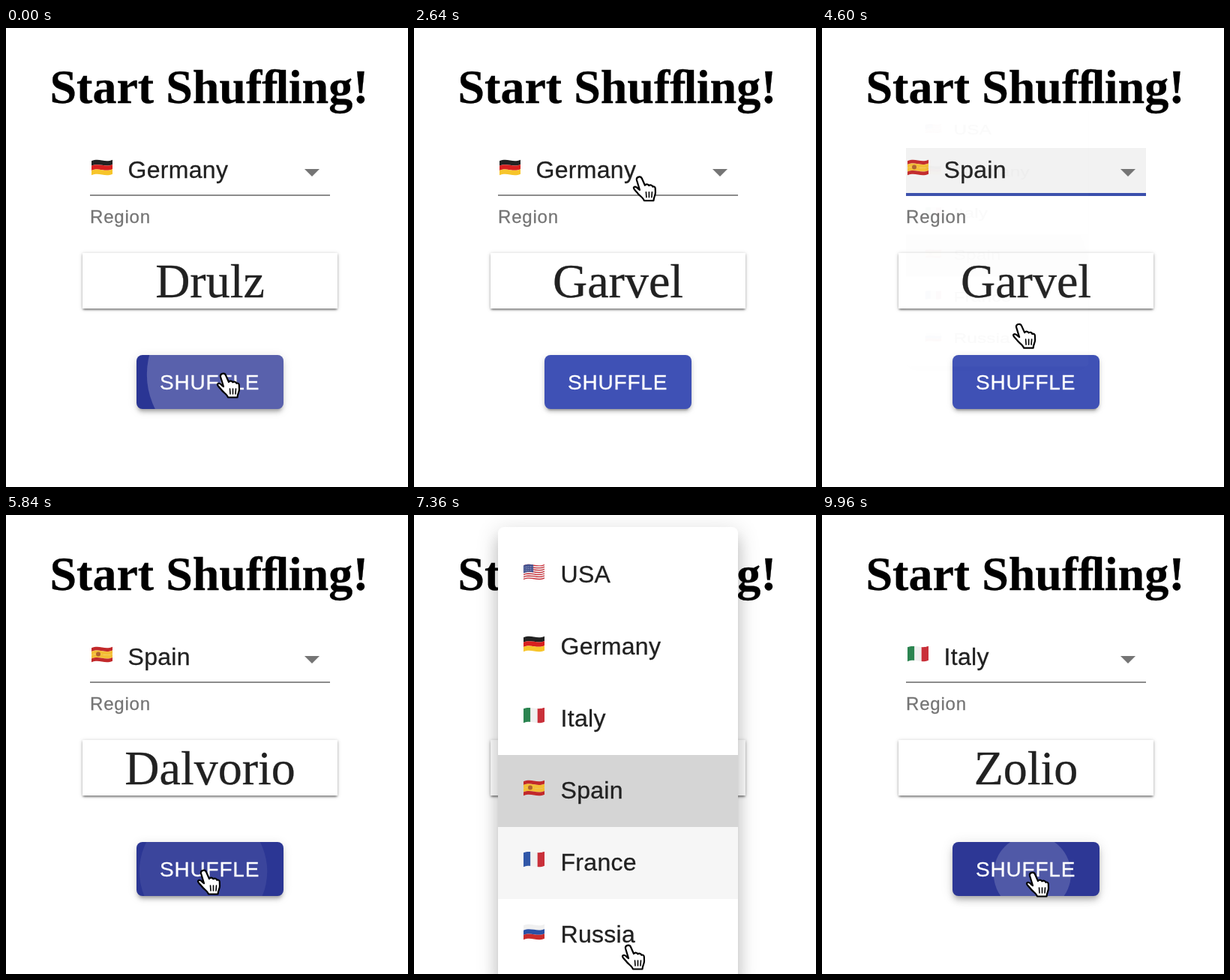
An HTML page for the animation above (10000 ms loop, 536 by 612 pixels).

```html
<!DOCTYPE html>
<html lang="en">
<head>
<meta charset="utf-8">
<title>Start Shuffling!</title>
<style>
html, body { margin: 0; width: 100%; height: 100%; overflow: hidden; background: #fff; }
#stage { position: relative; width: 536px; height: 612px; overflow: hidden; background: #fff; font: 32px/0 "Liberation Sans", Arial, sans-serif; color: #212121; }
#stage div, #stage svg { position: absolute; }
.text { white-space: nowrap; -webkit-text-stroke: .3px; }
.serif { font-family: "Liberation Serif", Times, serif; font-size: 64px; left: 0; width: 100%; text-align: center; }
#title { top: 78.5px; left: 3px; font-weight: bold; color: #000; }
#select { left: 112px; top: 160px; width: 320px; height: 64px; }
#focus { inset: 0; background: #f2f2f2; }
#line { left: 0; top: 62px; width: 320px; height: 2px; background: #8c8c8c; }
#accent { left: 0; top: 60px; width: 320px; height: 4px; background: #3a4fac; }
#arrow { left: 286px; top: 28px; border: 10px solid transparent; border-top-color: #757575; border-bottom: 0; }
#value { left: 50.5px; top: 29px; letter-spacing: .3px; }
#flag { left: 2px; top: 15px; }
#region { left: 112px; top: 251.5px; font-size: 24px; letter-spacing: .8px; color: #757575; }
#card { left: 102px; top: 300px; width: 340px; height: 74px; background: #fff;
  box-shadow: 0 4px 2px -2px rgba(0,0,0,.2), 0 2px 2px rgba(0,0,0,.2), 0 1px 5px rgba(0,0,0,.26); }
#name { top: 37.5px; }
#button { left: 174px; top: 436px; width: 196px; height: 72px; border-radius: 8px; overflow: hidden; color: #fff; }
#button .text { left: 31px; top: 36.5px; font-size: 28px; letter-spacing: .8px; }
#menu { left: 112px; width: 320px; height: 608px; border-radius: 8px; background: #fff;
  box-shadow: 0 10px 10px -6px rgba(0,0,0,.2), 0 16px 20px 2px rgba(0,0,0,.14), 0 6px 28px 4px rgba(0,0,0,.12); }
.item { left: 0; width: 320px; height: 96px; overflow: hidden; }
.item svg { left: 34px; top: 33px; }
.item .text { left: 83.5px; top: 47px; letter-spacing: .3px; }
.ripple { border-radius: 50%; background: currentColor; }
#cursor { left: 0; top: 0; overflow: visible; }
</style>
</head>
<body>
<div id="stage">
  <div id="title" class="text serif">Start Shuf&#xFB02;ing!</div>
  <div id="select">
    <div id="focus"></div>
    <div id="flag"></div>
    <div id="value" class="text"></div>
    <div id="arrow"></div>
    <div id="line"></div>
    <div id="accent"></div>
  </div>
  <div id="region" class="text">Region</div>
  <div id="card"><div id="name" class="text serif"></div></div>
  <div id="button"><div class="text">SHUFFLE</div></div>
  <div id="menu"></div>
  <svg id="cursor" width="32" height="36">
    <g id="hand" fill="#fff" stroke="#000" stroke-width="2.2" stroke-linejoin="round" stroke-linecap="round">
      <path d="M-3 3.5C-4 -1 2.5 -2.5 4 1.5L8 10.5C9 8.500 12.500 8.500 13.300 10.800C15 9.500 17.700 10 18.300 12.300C20 11.500 21.700 12.500 21.800 14.500L22 20C22 24 20 25 19.500 31H7C6 27 1 25 -2.500 20C-4.500 17.500 -7.500 15.500 -7 13.500C-6 11.500 -3 12.500 -1 15L1 16.500Z"/>
      <path d="M9.500 19.500L10 26.500M13.500 19.500V26.500M17.500 19.500L17 26.500" fill="none" stroke-width="1.6"/>
    </g>
    <path id="pointer" d="M0 0V24L5.500 19L9.500 28L13.500 26L9.500 17.500L17 17Z" stroke="#fff" stroke-width="2"/>
  </svg>
</div>
<script>
const LOOP = 10000, MENU_TIME = 312;
const $ = id => document.getElementById(id);
const clamp = v => Math.max(0, Math.min(1, v));
const mix = (a, b, k) => a + (b - a) * k;

// cubic-bezier(.4, 0, .2, 1)
function ease(x) {
  x = clamp(x);
  let lo = 0, hi = 1;
  for (let i = 0; i < 18; i++) {
    const s = (lo + hi) / 2, r = 1 - s;
    if (1.2 * r * r * s + .6 * r * s * s + s * s * s < x) lo = s; else hi = s;
  }
  return 3 * (1 - lo) * lo * lo + lo ** 3;
}

const FLAG_TOP = 1.5, FLAG_HEIGHT = 19;
const wave = (y, h) => {
  const b = y + h;
  return `M0 ${y + .8}C5 ${y - 1.2} 9 ${y - .8} 14 ${y}S23 ${y + 1.2} 28 ${y - .8}V${b - .8}` +
    `C23 ${b + 1.2} 19 ${b + .8} 14 ${b}C9 ${b - .8} 5 ${b - 1.2} 0 ${b + .8}Z`;
};
const rows = colors => colors.map((c, i) => {
  const h = FLAG_HEIGHT / colors.length;
  return `<path fill="${c}" d="${wave(FLAG_TOP + i * h, h)}"/>`;
}).join("");
const columns = colors => `<g style="clip-path:path('${wave(FLAG_TOP, FLAG_HEIGHT)}')">` +
  colors.map((c, i) => `<path fill="${c}" d="M${i * 28 / 3} -1h9.400v24h-9.400z"/>`).join("") + "</g>";

const red = "#c9303a", white = "#f0f0f0";
const regions = [
  ["USA", rows(Array.from({ length: 13 }, (_, i) => i % 2 ? white : red)) +
    '<path fill="#43528f" d="M0 2.300C5 .3 9 .7 13 1.300V11.500C9 10.500 5 10.500 0 12.500Z"/>' +
    '<path stroke="#c5cbe2" stroke-dasharray="1 1.500" d="M1.500 4.500L12 3.500M1.500 7L12 6M1.500 9.500L12 8.500"/>'],
  ["Germany", rows(["#222", "#d8201f", "#f7c52b"])],
  ["Italy", columns(["#2b8450", white, red])],
  ["Spain", rows(["#c2292b", "#f3bd35", "#f3bd35", "#c2292b"]) + '<circle cx="9" cy="10.500" r="3" fill="#b0622f"/>'],
  ["France", columns(["#3157a8", white, red])],
  ["Russia", rows([white, "#2b50a5", "#c92c2c"])]
];
const flag = i => `<svg width="28" height="22">${regions[i][1]}</svg>`;

function add(parent, cls, html = "") {
  const el = document.createElement("div");
  el.className = cls;
  el.innerHTML = html;
  parent.append(el);
  return el;
}
const items = regions.map(([label], i) => {
  const el = add($("menu"), "item", `${flag(i)}<div class="text">${label}</div>`);
  el.style.top = 16 + 96 * i + "px";
  return el;
});

// open time, close time, menu top, region picked on close, time the select loses focus
const menus = [
  { open: 3010, close: 4340, top: 32, pick: 3, blur: 5050 },
  { open: 6650, close: 8807, top: 16, pick: 2, blur: 9480 }
];

// press time, release time, local x, local y, name shown on release or item pressed
const presses = [
  [-290, -20, 115, 26, "Drulz"], [420, 510, 115, 26, "Jolmar"], [820, 910, 115, 26, "Hestin"],
  [1220, 1290, 115, 26, "Kelbo"], [1410, 1600, 115, 26, "Garvel"],
  [4230, 4340, 150, 66, 3],
  [5050, 5130, 89, 39, "Tacelo"], [5320, 5380, 89, 39, "Ruvando"], [5580, 5610, 89, 39, "Dalvorio"],
  [8668, 8807, 166, 34, 2],
  [9480, 9560, 106, 42, "Zolio"], [9780, 10050, 106, 42, ""]
].map(([down, up, x, y, out]) => {
  const onItem = typeof out === "number";
  const [w, h] = onItem ? [320, 96] : [196, 72];
  const r = Math.hypot(Math.max(w - x, x) + 1, Math.max(h - y, y) + 1);
  const el = add(onItem ? items[out] : $("button"), "ripple");
  Object.assign(el.style, { left: x - r + "px", top: y - r + "px", width: 2 * r + "px", height: 2 * r + "px" });
  return { down, up, out, onItem, el };
});

const path = [
  [0, 289, 462], [1950, 289, 462], [2600, 300, 200], [3050, 296, 190], [3280, 267, 349], [3500, 263, 386],
  [4500, 262, 386], [4980, 263, 475], [5900, 263, 475], [6200, 402, 180], [6800, 402, 182], [7220, 312, 400],
  [7360, 285, 575], [7900, 283, 560], [8500, 279, 258], [9000, 279, 258], [9420, 280, 478], [LOOP, 280, 478]
];
function cursorAt(t) {
  t = Math.max(0, t);
  const i = Math.max(1, path.findIndex(p => p[0] >= t));
  const a = path[i - 1], b = path[i];
  const u = clamp((t - a[0]) / (b[0] - a[0])), k = u * u * (3 - 2 * u);
  return [mix(a[1], b[1], k), mix(a[2], b[2], k)];
}

const inside = ([x, y], l, t, w, h) => x >= l && x < l + w && y >= t && y < t + h;
const menuAt = t => menus.find(m => t >= m.open && t < m.close + MENU_TIME);

// What the pointer rests on: an item index, "button", "select" or null
function target(t) {
  const p = cursorAt(t), m = menuAt(t);
  if (m) {
    const i = Math.floor((p[1] - m.top - 16) / 96);
    return inside(p, 112, m.top, 320, 608) && items[i] ? i : null;
  }
  return inside(p, 174, 436, 196, 72) ? "button" : inside(p, 112, 160, 320, 64) ? "select" : null;
}

// Share of the recent past spent on each target, which gives the hover fades
function hoverShare(t, span) {
  const share = {}, n = 15;
  for (let i = 0; i < n; i++) {
    const k = target(t - 55 - span * (i + .5) / n);
    share[k] = (share[k] || 0) + 1 / n;
  }
  return share;
}

function drawMenu(t, region) {
  const m = menuAt(t);
  $("menu").style.display = m ? "" : "none";
  if (!m) return;
  const closing = t >= m.close;
  const u = (t - (closing ? m.close : m.open)) / MENU_TIME;
  const alpha = closing ? 1 - ease(u) : ease(u);
  const grow = closing ? 1 - ease((u - .333) / .667) : ease(u / .667);
  Object.assign($("menu").style, {
    top: m.top + "px",
    opacity: alpha,
    transformOrigin: `0 ${192 - m.top}px`,
    transform: grow < 1 ? `scale(${mix(.75, 1, grow)}, ${mix(.5625, 1, grow)})` : "none"
  });
  const share = hoverShare(t, 150);
  items.forEach((el, i) => {
    const shade = i === region ? .165 : .09 * (share[i] || 0);
    el.style.background = `rgba(0,0,0,${shade})`;
  });
}

function drawButton(t) {
  const hover = hoverShare(t, 250).button || 0;
  const press = presses.find(p => !p.onItem && t >= p.down && t < p.up);
  const lift = Math.max(.3 * hover, press ? .7 * ease((t - press.down) / 250) : 0);
  const rgb = [63, 81, 181].map((c, i) => Math.round(mix(c, [42, 53, 148][i], hover)));
  const px = (a, b) => mix(a, b, lift) + "px";
  $("button").style.background = `rgb(${rgb})`;
  $("button").style.boxShadow = `0 ${px(6, 4)} ${px(2, 8)} ${px(-4, -2)} rgba(0,0,0,.2),` +
    `0 ${px(4, 8)} ${px(4, 10)} rgba(0,0,0,.14), 0 2px ${px(10, 20)} rgba(0,0,0,.12)`;
}

function drawRipples(t) {
  for (const p of presses) {
    const live = t >= p.down && t < p.up + 550;
    p.el.style.display = live ? "" : "none";
    if (!live) continue;
    const k = ease((t - p.down) / 550);
    p.el.style.transform = `scale(${k})`;
    p.el.style.opacity = (.1 + .15 * k) * (1 - ease((t - p.up) / 550));
  }
}

let shown = -1;
function draw(t) {
  const region = menus.reduce((r, m) => t >= m.close ? m.pick : r, 1);
  if (region !== shown) {
    shown = region;
    $("flag").innerHTML = flag(region);
    $("value").textContent = regions[region][0];
  }
  $("name").textContent = presses.reduce((n, p) => !p.onItem && t >= p.up ? p.out : n, "Drulz");

  const focused = menus.some(m => t >= m.open && t < m.blur);
  const bar = Math.max(...menus.map(m => ease((t - m.open) / 200) - ease((t - m.blur) / 200)));
  $("focus").style.display = focused ? "" : "none";
  $("accent").style.transform = `scaleX(${bar})`;

  drawMenu(t, region);
  drawButton(t);
  drawRipples(t);

  const [x, y] = cursorAt(t), hand = target(t) !== null;
  $("cursor").style.transform = `translate(${x}px, ${y - .5}px)`;
  $("hand").style.display = hand ? "" : "none";
  $("pointer").style.display = hand ? "none" : "";
}

function tick() {
  draw(performance.now() % LOOP);
  requestAnimationFrame(tick);
}
tick();
</script>
</body>
</html>
```
